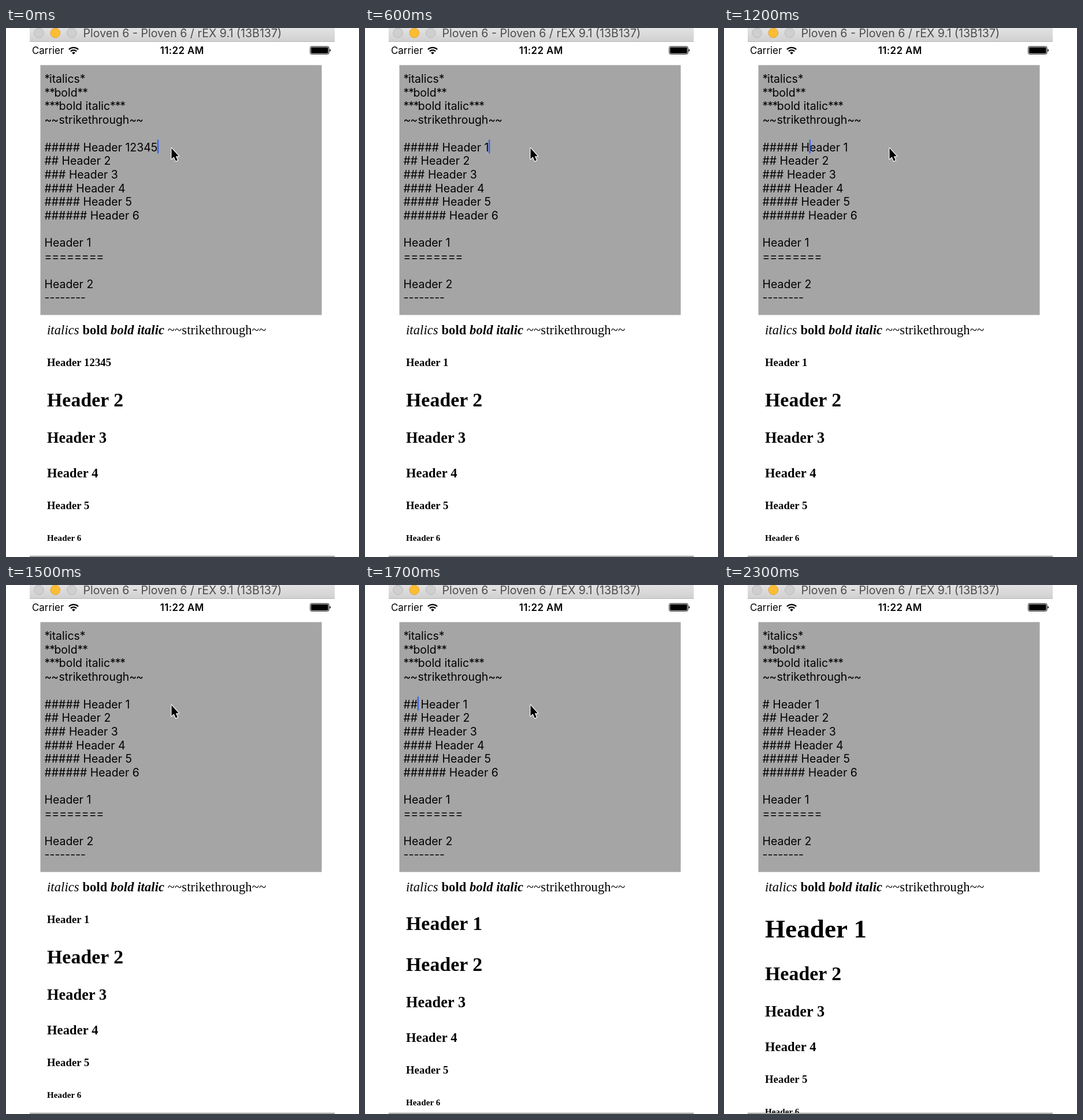
An HTML page that plays this animation: 611 px wide and 917 px high, repeating every 2.4 s.

```html
<!DOCTYPE html>
<html lang="en">
<head>
<meta charset="utf-8">
<title>Markdown preview</title>
<style>
  html, body { margin: 0; width: 100%; height: 100%; overflow: hidden; background: #fff; }
  svg { display: block; }
  .ui { font-family: Inter, Roboto, sans-serif; }
  .editor { font-size: 19.45px; }
  .mark { letter-spacing: -1.1px; }
  .preview { font-family: "Liberation Serif", "Times New Roman", serif; font-size: 22.5px; letter-spacing: .1px; }
  .head { font-weight: bold; }
  .b { font-weight: bold; }
  .i { font-style: italic; }
</style>
</head>
<body>
<svg width="611" height="917" viewBox="0 0 611 917">
  <defs>
    <linearGradient id="bar" x1="0" y1="0" x2="0" y2="1">
      <stop offset="0" stop-color="#e3e2e3"/>
      <stop offset="1" stop-color="#d1d0d1"/>
    </linearGradient>
    <clipPath id="screen"><rect x="41" y="498" width="528" height="417"/></clipPath>
  </defs>

  <!-- Title bar -->
  <rect x="41" width="528" height="24" fill="url(#bar)"/>
  <rect x="41" y="23" width="528" height="1" fill="#b4b3b4"/>
  <g stroke-width="1">
    <circle cx="57" cy="8.5" r="8.3" fill="#d0cfd0" stroke="#b9b8b9"/>
    <circle cx="85.3" cy="8.5" r="8.3" fill="#fdbd33" stroke="#e0a22c"/>
    <circle cx="113.7" cy="8.5" r="8.3" fill="#d0cfd0" stroke="#b9b8b9"/>
  </g>
  <text class="ui" x="133.5" y="16" font-size="19.6" fill="#4b4b4b">Ploven 6 - Ploven 6 / rEX 9.1 (13B137)</text>

  <!-- Status bar -->
  <g class="ui" font-size="16.9">
    <text x="45" y="45">Carrier</text>
    <text x="304.7" y="45" text-anchor="middle" font-weight="600" letter-spacing=".4">11:22 AM</text>
  </g>
  <g fill="none" stroke="#000" stroke-width="2.3">
    <path d="M108.9 37.2a11.5 11.5 0 0 1 16.2 0"/>
    <path d="M111.9 40.4a7.2 7.2 0 0 1 10.2 0"/>
  </g>
  <path d="M117 45.8l-2.8 -2.9a4 4 0 0 1 5.6 0z"/>
  <rect x="526.6" y="32.1" width="32.4" height="13.2" rx="2.4" fill="none" stroke="#000" stroke-width="1"/>
  <rect x="528" y="33.5" width="29.6" height="10.4" rx="1.3"/>
  <path d="M560.3 36.5q1.8 .6 1.8 2.2t-1.8 2.2z"/>

  <!-- Editor -->
  <rect x="59.5" y="64.3" width="487" height="433.2" fill="#a5a5a5"/>
  <g id="editor" class="ui editor"></g>
  <rect id="caret" y="193.5" width="2.6" height="24" rx="1" fill="#4166df"/>
  <path id="pointer" d="M286.5 208.3v18.7l4.1 -3.8 3.2 7.4 3.1 -1.3 -3.1 -7.1h5.2z"
        stroke="#fff" stroke-width="2.4" paint-order="stroke" stroke-linejoin="round"/>

  <!-- Preview -->
  <g class="preview" clip-path="url(#screen)">
    <text x="71" y="530.5"><tspan class="i">italics</tspan> <tspan class="b">bold</tspan> <tspan class="b i">bold italic</tspan> ~~strikethrough~~</text>
    <text id="first" class="head" x="71"></text>
    <g id="rest"></g>
  </g>
  <rect x="41" y="915" width="528" height="1.3" fill="#777"/>
</svg>

<script>
const LOOP = 2400, POINTER_OFF = 2200;
const LEFT = 66.5, TOP = 95, PITCH = 23.7, EM = 22.5;
const MARK_WIDTH = { "*": 8.45, "~": 12.5 };
const byId = id => document.getElementById(id);

function add(parent, tag, attrs, content = "") {
  const el = document.createElementNS("http://www.w3.org/2000/svg", tag);
  for (const key in attrs) el.setAttribute(key, attrs[key]);
  el.textContent = content;
  return parent.appendChild(el);
}

const lines = [
  "*italics*", "**bold**", "***bold italic***", "~~strikethrough~~", "",
  "", "## Header 2", "### Header 3", "#### Header 4", "##### Header 5", "###### Header 6", "",
  "Header 1", "========", "", "Header 2", "--------"
];

const rows = lines.map((line, i) => {
  const row = add(byId("editor"), "text", { x: LEFT, y: TOP + i * PITCH });
  const [, marks, word] = line.match(/^([*~]*)([^*~]*)/);
  if (marks) {
    add(row, "tspan", { class: "mark" }, marks);
    add(row, "tspan", { x: LEFT + MARK_WIDTH[marks[0]] * marks.length }, word);
    add(row, "tspan", { class: "mark" }, marks);
  } else {
    row.textContent = line;
  }
  return row;
});
const edited = rows[5];

// Per heading level: size in em, baseline as first heading, baseline of the heading below it
const levels = {
  1: [2, 611, 685],
  2: [1.5, 598, 669.3],
  3: [1.17, 591, 659],
  5: [0.83, 586, 656]
};

// Headings below the first: level, size in em, offset from the second heading
[[2, 1.5, 0], [3, 1.17, 63], [4, 1, 122.7], [5, 0.83, 178], [6, 0.67, 233]].forEach(([n, em, y]) =>
  add(byId("rest"), "text", { class: "head", x: 71, y, "font-size": em * EM }, "Header " + n));

// Time, hashes, digits, caret position (-1 when blinked off)
const steps = [
  [0, 5, "12345", 18],
  [200, 5, "1234", 17],
  [300, 5, "123", 16],
  [400, 5, "12", 15],
  [500, 5, "1", 14],
  [800, 5, "1", 13],
  [900, 5, "1", 12],
  [1000, 5, "1", 11],
  [1100, 5, "1", 9],
  [1200, 5, "1", 7],
  [1300, 5, "1", 5],
  [1500, 5, "1", -1],
  [1600, 3, "1", 3],
  [1700, 2, "1", 2],
  [1800, 1, "1", 1],
  [2200, 1, "1", -1]
];

let shown;
function show(step) {
  if (step === shown) return;
  shown = step;
  const [time, hashes, digits, pos] = step;
  const title = "Header " + digits;
  const [em, y, below] = levels[hashes];
  edited.textContent = "#".repeat(hashes) + " " + title;

  const caret = byId("caret");
  caret.style.visibility = pos < 0 ? "hidden" : "visible";
  if (pos > 0) caret.setAttribute("x", LEFT - 0.5 + edited.getSubStringLength(0, pos));
  byId("pointer").style.visibility = time < POINTER_OFF ? "visible" : "hidden";

  const first = byId("first");
  first.textContent = title;
  first.setAttribute("y", y);
  first.setAttribute("font-size", em * EM);
  byId("rest").setAttribute("transform", `translate(0 ${below})`);
}

const start = performance.now();
function tick() {
  const t = (performance.now() - start) % LOOP;
  show(steps.findLast(step => step[0] <= t));
  requestAnimationFrame(tick);
}
tick();
</script>
</body>
</html>
```
